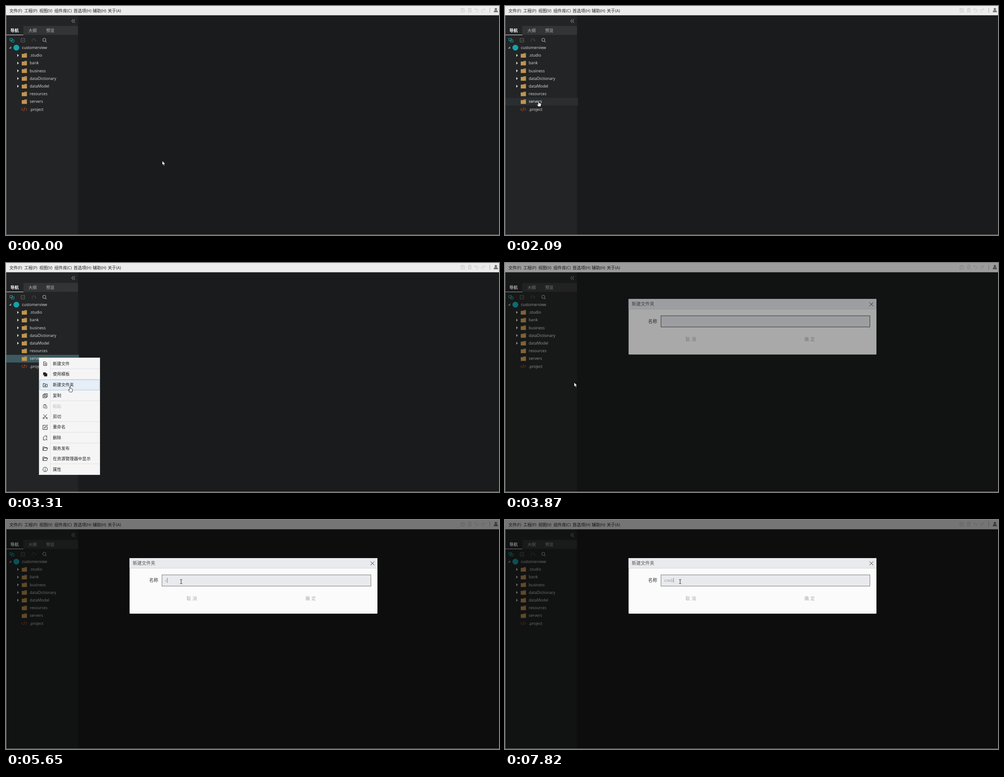
Write an HTML page that moves like this. It is 1095 px wide and 511 px high and loops after 8000 ms.

```html
<!DOCTYPE html>
<html lang="zh-CN">
<head>
<meta charset="utf-8">
<title>新建文件夹</title>
<style>
html, body { margin: 0; width: 100%; height: 100%; overflow: hidden; background: #1a1b1c; }
svg { display: block; width: 1095px; height: 511px; }
text { font: 9.33px "Noto Sans CJK SC", "Noto Sans CJK", sans-serif; white-space: pre; }
.latin { font: 8.65px "Open Sans", "Noto Sans", sans-serif; }
.big { font-size: 10px; }
.bold { font-weight: 700; }
.line { fill: none; stroke-width: 1; }
.off { display: none; }
#tree text { fill: #dedede; }
#tree .hot text { fill: #fff; }
.row rect { fill: none; }
.hot rect { fill: #2a2e30; }
.picked rect { fill: #3d5a60; }
.item .glow { fill: none; }
.item.hot .glow { fill: #e6eef7; stroke: #a5c6de; }
.item { stroke: #222; }
.item text { stroke: none; fill: #222; }
.item.idle { stroke: #666; }
.item.idle text { fill: #bbb; }
</style>
</head>
<body>
<svg viewBox="0 0 1095 511">
  <rect width="1095" height="511" fill="#1a1b1c"/>

  <rect y="21" width="160" height="490" fill="#232425"/>
  <rect x="160" y="21" width="2" height="490" fill="#1f2021"/>
  <rect x="160" y="21" width="1" height="490" fill="#161718"/>
  <rect y="44.5" width="160" height="20" fill="#333435"/>
  <rect y="44.5" width="38.5" height="20" fill="#232425"/>
  <rect y="64" width="38.5" height="1" fill="#e8e8e8"/>
  <path class="line" stroke="#b5b5b5" d="M149 29.5L146 33.5L149 37.5M153 29.5L150 33.5L153 37.5"/>
  <text class="bold" x="9.7" y="58" fill="#fff">导航</text>
  <text x="49.7" y="58" fill="#b8b8b8">大纲</text>
  <text x="89" y="58" fill="#b8b8b8">预览</text>

  <g class="line">
    <path stroke="#1aa5ad" d="M8.5 72.5h6v5h-6zM12 75.5h6v5h-6z"/>
    <path stroke="#666" d="M33.5 72.5h8v8h-8zM35.5 76.5h4"/>
    <path stroke="#555" d="M59 79.5A3.8 3.8 0 1 1 65.5 76.5M63.5 76.5h2.5v2.5"/>
    <path stroke="#999" stroke-width="1.3" d="M87.5 78.2L90 80.8"/>
    <circle cx="85" cy="75.5" r="3.3" stroke="#999" stroke-width="1.3"/>
  </g>

  <g id="tree"></g>

  <rect width="1095" height="20.7" fill="#ececec"/>
  <g id="bar" fill="#222"></g>
  <g class="line" stroke="#c9c9c9">
    <path d="M1010.5 5.5h6.5l1.5 1.5v6.5h-8zM1012.5 5.5v3h4v-3M1012.5 11h4"/>
    <path d="M1026 6.5h8M1028.5 6v-1.5h3V6M1027 7v6.5h6V7M1029 8.5v3.5M1031 8.5v3.5"/>
    <path d="M1043.5 5L1041 7.5L1043.5 10M1041 7.5h5a2.8 2.8 0 0 1 0 5.6h-2"/>
    <path d="M1061.500 5L1064 7.500L1061.500 10M1064 7.500h-5a2.800 2.800 0 0 0 0 5.600h2"/>
  </g>
  <rect x="1074" y="4" width="1" height="11" fill="#aaa"/>
  <g fill="#777">
    <circle cx="1088" cy="7" r="2.700"/>
    <path d="M1083.500 14v-2q0-2 2.500-2.500h4q2.500.5 2.500 2.500v2z"/>
  </g>

  <rect id="shade" width="1095" height="510"/>
  <path fill="#777" d="M0 21h1v489h1094v1H0z"/>

  <g id="menu">
    <rect x="76" y="213" width="134" height="261" fill="#000" opacity=".2"/>
    <rect x="73.500" y="211.500" width="135" height="261" fill="#f5f5f5" stroke="#c4c4c4"/>
    <path class="line" stroke="#e2e2e2" d="M98.500 212v260"/>
  </g>

  <g id="dialog">
    <rect x="274.500" y="85" width="550.500" height="124" rx="1" fill="#fbfbfb"/>
    <path fill="#e9eaee" d="M274.500 85h550.500v22h-550.500z"/>
    <rect x="274.500" y="107" width="550.500" height="1" fill="#d0d1d4"/>
    <text class="big" x="281.500" y="100" fill="#555">新建文件夹</text>
    <path class="line" stroke="#333" stroke-width="1.200" d="M809.500 92.500l8.500 8.500M818 92.500l-8.500 8.500"/>
    <text class="big" x="318" y="138.300" fill="#333">名称</text>
    <rect id="field" x="346.500" y="122.500" width="464" height="25" fill="#e9eaee"/>
    <text class="big" x="401" y="179" fill="#aaa" letter-spacing=".5">取 消</text>
    <text class="big" x="665" y="179" fill="#aaa" letter-spacing=".5">确 定</text>
    <text id="typed" class="latin" x="353.800" y="138.300" fill="#999"></text>
    <rect id="caret" y="129" width="1" height="11" fill="#888"/>
  </g>

  <g id="cursor" stroke-linejoin="round">
    <path id="arrow" fill="#fff" stroke="#111" stroke-width=".8" d="M0 0V9.500L2.200 7.500L3.800 11L5.500 10.200L4 7H7z"/>
    <path id="hand" fill="#fff" stroke="#111" stroke-width=".8" d="M-1 .6Q0-.6 1 .6V4.500L5 5.300Q6 5.700 5.800 7.500L4.800 12.500H-.5L-3.500 8.300Q-3.700 6.800-2.500 7L-1 8.300z"/>
    <path id="beam" class="line" stroke="#222" d="M-2.500-4.500h2L0-4L.5-4.500h2M0-4V4M-2.500 4.500h2L0 4L.5 4.500h2"/>
  </g>
</svg>

<script>
const $ = id => document.getElementById(id);
const add = (id, html) => $(id).insertAdjacentHTML('beforeend', html);

const bar = [[7.5, '文件', 'F'], [40.5, '工程', 'P'], [74, '视图', 'V'], [107.5, '组件库', 'C'],
  [150, '首选项', 'H'], [192.5, '辅助', 'H'], [226, '关于', 'A']];
for (const [x, name, key] of bar)
  add('bar', `<text x="${x}" y="14">${name}<tspan class="latin">(${key})</tspan></text>`);

// Tree rows, drawn around their vertical centre
const folder = '<path fill="#c19653" d="M35 -3.500h5.500l1-1.500h5v10H35z"/><path fill="#8a6a38" d="M42 -3.700h3.500v.9H42z"/>';
const code = '<path class="line" stroke="#e0592f" stroke-width="1.300" d="M37.500-3l-3 3l3 3M43.500-3l3 3l-3 3M41.700-4l-2.400 8"/>';
const closed = '<path fill="#ddd" d="M25-3.300L28.500 0L25 3.300z"/>';
const root = '<path fill="#999" d="M11.500-3v5h-5z"/><circle cx="23" cy="0" r="6.500" fill="#14a3ad"/>';
const names = ['customerview', '.studio', 'bank', 'business', 'dataDictionary', 'dataModel',
  'resources', 'servers', '.project'];
names.forEach((name, i) => {
  const icon = i == 0 ? root : (i < 6 ? closed : '') + (i == 8 ? code : folder);
  add('tree', `<g class="row" transform="translate(0 ${93 + 17.2 * i})">
    <rect x="1" y="-8.500" width="161" height="17.200"/>${icon}
    <text class="latin" x="${i ? 52.8 : 35.3}" y="3">${name}</text></g>`);
});
const rows = document.querySelectorAll('.row');

// Context menu: label, icon path, separator below
const openFolder = 'M-5 4v-8h3.500l1 1.500h4v2M-5 4l2-5.500h8.500l-2 5.500z';
const items = [
  ['新建文件', 'M-3.500-4h4.500l2.500 2.500v5.500h-7zM-1.500 .5h3.500M.2-1.300v3.500', 1],
  ['使用模板', 'M-4 2v-6h6M-2-2h6v6h-6z', 1],
  ['新建文件夹', 'M-4.500 4v-7.500h3.500l1 1.500h4.500v6zM-2 1h4M0-1v4', 1],
  ['复制', 'M-2.500-2.500v-2h7.500v7h-2M-5-2.500h7.500v7h-7.500zM-3.500 0h4.500M-3.500 2h4.500', 1],
  ['粘贴', 'M-1 3h-3v-6.500h6.500v2M-2.500-3.500v-1h3.500v1M-.5-1.500h3l1.500 1.500v4h-4.500zM1 1h2', 0],
  ['剪切', 'M-4-5l6.500 7.500M4-5l-6.500 7.500M-2 3.500a1.500 1.500 0 1 0-3 0a1.500 1.500 0 1 0 3 0M5 3.500a1.500 1.500 0 1 0-3 0a1.500 1.500 0 1 0 3 0', 1],
  ['重命名', 'M1-4.500h-6v9.500h9.500v-6M-2 2l.5-2l5.500-5.500l1.500 1.500l-5.500 5.500z', 1],
  ['删除', 'M0 4.500h-4v-6l3-3h4.500v4.500M1 1.500l3.500 3.500M4.500 1.500l-3.500 3.500', 1],
  ['服务发布', openFolder, 0],
  ['在资源管理器中显示', openFolder, 1],
  ['属性', 'M5 0a5 5 0 1 0-10 0a5 5 0 1 0 10 0M.5-2.800l-.2 1M.2-.5l-.7 3.500h1', 0]
];
let y = 224.2;
items.forEach(([name, path, split], i) => {
  const fill = i == 1 ? '#222' : 'none';
  const rule = split && i != 2 ? '<path stroke="#dfdfdf" d="M99 11.800h109"/>' : '';
  add('menu', `<g class="item${i == 4 ? ' idle' : ''}" transform="translate(0 ${y})">${rule}
    <rect class="glow" x="75" y="-11.300" width="133" height="23" rx="1" stroke="none"/>
    <path transform="translate(87 .5)" fill="${fill}" d="${path}"/>
    <text x="104" y="3.300">${name}</text></g>`);
  y += split ? 23.85 : 22.6;
});
const cells = document.querySelectorAll('.item');

// time, pointer, x, y, hovered tree row or menu item
const moves = [
  [0, 'arrow', 347, 345.5], [120, 'arrow', 332, 342], [260, 'arrow', 297, 335],
  [410, 'arrow', 258, 322], [550, 'arrow', 215, 305], [690, 'arrow', 180, 284],
  [830, 'arrow', 150, 258], [980, 'hand', 118, 232, 8], [1120, 'hand', 95, 220, 7],
  [1240, 'hand', 85, 224, 8], [1380, 'hand', 79, 225, 8], [1530, 'hand', 77, 220, 7],
  [1670, 'hand', 76, 216, 7], [1810, 'hand', 76, 213, 7], [2090, 'hand', 74.5, 212, 7],
  [2370, 'arrow', 74.5, 211.5], [2650, 'hand', 81, 218, 0], [2780, 'hand', 93, 229, 0],
  [2910, 'hand', 108, 244, 1], [3050, 'hand', 122, 257, 1], [3180, 'hand', 135, 268, 2],
  [3310, 'hand', 142, 275.5, 2], [3870, 'arrow', 153.5, 266.5], [4030, 'arrow', 337, 193.5],
  [4150, 'arrow', 366, 163], [4290, 'beam', 382, 143], [4430, 'beam', 389, 137.5]
];
// time, letters typed, caret shown
const keys = [[0, 0, 0], [4570, 0, 1], [5090, 0, 0], [5650, 1, 1], [6080, 2, 1],
  [6640, 2, 0], [7140, 3, 1], [7670, 4, 1], [7820, 5, 1]];
const caretX = [354, 358, 361, 366.5, 372, 374];

const at = (list, t) => list.findLast(step => step[0] <= t);
const show = (node, on) => node.classList.toggle('off', !on);

function draw(t) {
  const [, kind, x, y, hot] = at(moves, t);
  const [, typed, caret] = at(keys, t);
  const menu = t >= 2370 && t < 3870;
  const dialog = t >= 3870;
  const opening = t < 4030;

  for (const id of ['arrow', 'hand', 'beam']) show($(id), id == kind);
  $('cursor').setAttribute('transform', `translate(${x} ${y})`);
  rows.forEach((row, i) => {
    row.classList.toggle('hot', !menu && i === hot);
    row.classList.toggle('picked', menu && i == 7);
  });
  cells.forEach((cell, i) => cell.classList.toggle('hot', menu && i === hot));

  show($('menu'), menu);
  show($('dialog'), dialog);
  $('shade').setAttribute('opacity', !dialog ? 0 : opening ? .34 : .5);
  $('dialog').setAttribute('opacity', opening ? .65 : t < 4150 ? .98 : 1);
  $('dialog').setAttribute('transform', `translate(0 ${opening ? -4.7 : 0})`);
  $('field').setAttribute('stroke', t < 4570 ? '#444' : '#777');
  $('typed').textContent = 'credi'.slice(0, typed);
  $('caret').setAttribute('x', caretX[typed]);
  show($('caret'), caret);
}

const start = performance.now();
function tick() {
  draw((performance.now() - start) % 8000);
  requestAnimationFrame(tick);
}
tick();
</script>
</body>
</html>
```
